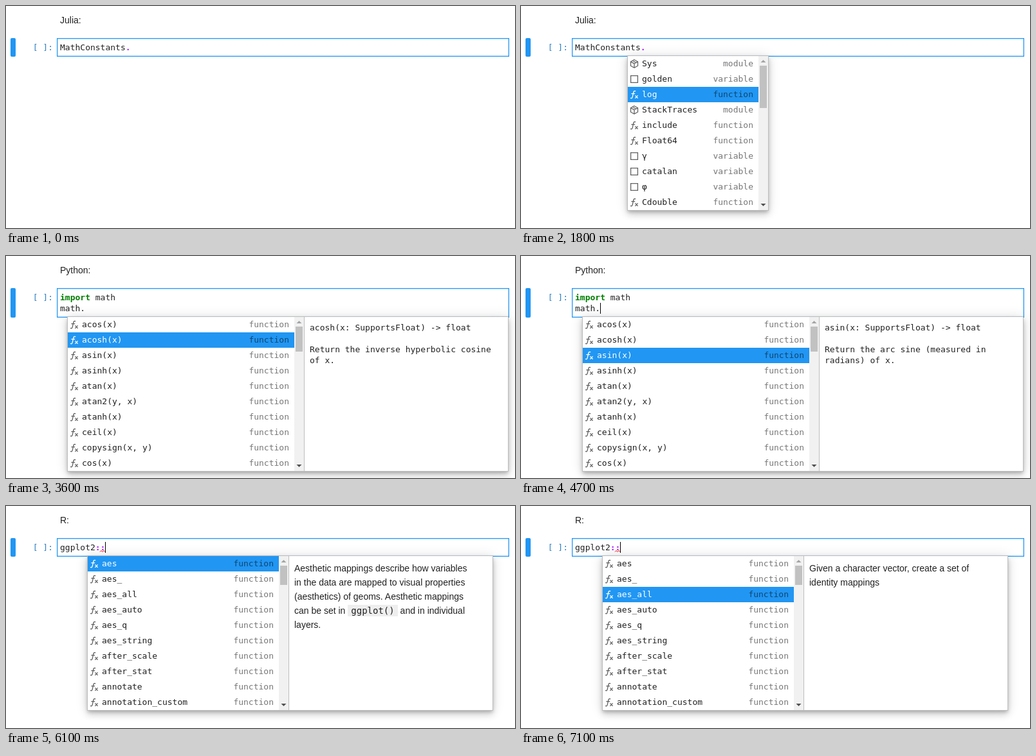
An HTML page that plays this animation: 791x346 px, repeating every 7.3 s.

```html
<!DOCTYPE html>
<html lang="en">
<head>
<meta charset="utf-8">
<title>Code completion in three languages</title>
<style>
html, body { margin: 0; width: 100%; height: 100%; overflow: hidden; background: #fff; }
body { position: relative; color: #212121; }
body * { position: absolute; box-sizing: border-box; }
.scene { inset: 0; visibility: hidden; }
.scene.on { visibility: visible; }
.title, .rich { font: 14px/22px "Liberation Sans", Arial, sans-serif; }
.title { left: 84px; top: 11px; }
.mono, .rich code { font: 13px/17px "DejaVu Sans Mono", monospace; white-space: pre; }
.prompt { right: calc(100% - 73px); top: 56px; color: #307fc1; }
.bar { left: 7px; top: 50px; width: 8px; border-radius: 2px; background: #2196f3; }
.editor { left: 79px; top: 50px; width: 703px; border: 1px solid #e0e0e0; background: #f5f5f5; }
.focus .editor { border-color: #2196f3; background: #fff; box-shadow: inset 0 0 2px #2196f3; }
.code { left: 84px; top: 56px; }
.code b, .code i { position: static; font-style: normal; font-weight: bold; }
.code b { color: #008000; }
.code i { color: #aa22ff; }
.squiggle { left: 0; top: 0; width: 100%; height: 100%; fill: none; stroke: #f00; }
.cursor { width: 1px; height: 17px; background: #000; visibility: hidden; }
.cursor.on { visibility: visible; }
.popup { height: 242px; border: 1px solid #bdbdbd; background: #fff; display: none;
  box-shadow: 0 3px 5px -1px rgba(0,0,0,.2), 0 6px 10px rgba(0,0,0,.14), 0 1px 18px rgba(0,0,0,.12); }
.popup.on { display: block; }
.row { left: 0; height: 24px; }
.row span { top: 3px; }
.row .name { left: 22px; }
.row .type { right: 8px; color: rgba(0,0,0,.54); }
.row svg { left: 2px; top: 4px; width: 16px; height: 16px; fill: none; stroke: #616161; stroke-width: 1.3; }
.row.on { background: #2196f3; }
.row.on .name { color: #fff; }
.row.on svg { stroke: #fff; }
.scroll { top: 0; width: 15px; height: 240px; background: #f1f1f1; }
.scroll svg { left: 0; top: 0; width: 15px; height: 240px; }
.thumb { left: 2px; top: 15px; width: 11px; background: #c1c1c1; }
.doc { top: 0; right: 0; height: 240px; border-left: 1px solid #bdbdbd; padding: 8px; overflow: hidden; display: none; }
.doc.on { display: block; }
.doc.mono { white-space: pre-wrap; }
.doc.rich { padding-right: 32px; }
.rich code { position: static; font-size: 14px; line-height: 22px; padding: 1px 5px; background: #eee; }
</style>
</head>
<body>
<script>
const LOOP = 7300;
const ICONS = {
  function: 'M10.2 3C8.4 1.6 7.2 2.8 6.7 5L5.3 11.4C4.8 13.7 3.6 14.4 2 13.3M3.4 6.6H9.2M9.4 9.4l4.2 4.4M13.6 9.4l-4.2 4.4',
  variable: 'M2.6 2.6h10.8v10.8H2.6z',
  module: 'M8 1.8l5.5 3v6.4l-5.5 3-5.5-3V4.8zM2.5 4.8L8 7.9l5.5-3.1M8 7.9v6.3M5.2 3.3l5.6 3.1'
};
const mathDoc = (name, text) => `${name}(x: SupportsFloat) -> float\n\nReturn the ${text} of x.`;
const aesIntro = 'Aesthetic mappings describe how variables in the data are mapped to visual properties (aesthetics) of geoms. ';

// popup: x, y of the border box, list width, doc width, thumb height
const scenes = [
  {
    start: 0, focus: 0, title: 'Julia:', lines: 1, code: 'MathConstants<i>.</i>',
    cursor: [194, 56], blinks: [200, 700, 1300, 1800],
    picks: [400, 900, 1200], popup: [165, 77, 203, 0, 66],
    items: ['Sys:module', 'golden:variable', 'log:function', 'StackTraces:module', 'include:function',
      'Float64:function', 'γ:variable', 'catalan:variable', 'φ:variable', 'Cdouble:function'],
    docs: []
  },
  {
    start: 2200, focus: 2600, title: 'Python:', lines: 2, code: '<b>import</b> math\nmath.',
    cursor: [123, 73], blinks: [2600, 3200, 3700, 4100, 4700],
    picks: [3100, 3600, 3900], popup: [95, 94, 352, 317, 39], docStyle: 'mono',
    items: ['acos(x)', 'acosh(x)', 'asin(x)', 'asinh(x)', 'atan(x)', 'atan2(y, x)', 'atanh(x)',
      'ceil(x)', 'copysign(x, y)', 'cos(x)'],
    docs: [
      mathDoc('acos', 'arc cosine (measured in radians)'),
      mathDoc('acosh', 'inverse hyperbolic cosine'),
      mathDoc('asin', 'arc sine (measured in radians)')
    ]
  },
  {
    start: 4900, focus: 5100, title: 'R:', lines: 1, code: 'ggplot2<i>::</i>', squiggle: 'M146 71.5l2-2 2 2 2-2 2 2',
    cursor: [154, 56], blinks: [5100, 5500, 6100, 6600, 7100],
    picks: [6000, 6500, 6800], popup: [126, 77, 297, 317, 30], docStyle: 'rich',
    items: ['aes', 'aes_', 'aes_all', 'aes_auto', 'aes_q', 'aes_string', 'after_scale', 'after_stat',
      'annotate', 'annotation_custom'],
    docs: [
      aesIntro + 'Aesthetic mappings can be set in <code>ggplot()</code> and in individual layers.',
      aesIntro + '<code>aes()</code> uses non-standard evaluation to capture the variable names. ' +
        '<code>aes_()</code> and <code>aes_string()</code> require you to explicitly quote the inputs ' +
        'either with "" for <code>aes_string()</code>, or with quote or ~ for <code>aes_()</code>.',
      'Given a character vector, create a set of identity mappings'
    ]
  }
];

function add(parent, cls, html = '', box = {}) {
  const el = document.createElement('div');
  el.className = cls;
  el.innerHTML = html;
  for (const key in box) el.style[key] = box[key] + 'px';
  return parent.appendChild(el);
}

function rowHtml(item) {
  const [name, type = 'function'] = item.split(':');
  return `<svg viewBox="0 0 16 16"><path d="${ICONS[type]}"/></svg>` +
    `<span class="mono name">${name}</span><span class="mono type">${type}</span>`;
}

function build(s) {
  const height = 12 + 17 * s.lines;
  const el = s.el = add(document.body, 'scene');
  add(el, 'title', s.title);
  add(el, 'bar', '', { height });
  add(el, 'mono prompt', '[ ]:');
  add(el, 'editor', '', { height });
  add(el, 'mono code', s.code);
  if (s.squiggle) el.insertAdjacentHTML('beforeend', `<svg class="squiggle"><path d="${s.squiggle}"/></svg>`);
  s.caret = add(el, 'cursor', '', { left: s.cursor[0], top: s.cursor[1] });

  const [left, top, list, docWidth, thumb] = s.popup;
  s.box = add(el, 'popup', '', { left, top, width: list + docWidth + 17 });
  s.rows = s.items.map((item, i) => add(s.box, 'row', rowHtml(item), { top: 24 * i, width: list }));
  const scroll = add(s.box, 'scroll',
    '<svg><path fill="#a3a3a3" d="M3.5 10l4-4 4 4z"/><path fill="#505050" d="M3.5 230l4 4 4-4z"/></svg>', { left: list });
  add(scroll, 'thumb', '', { height: thumb });
  s.panels = s.docs.map(text => add(s.box, 'doc ' + s.docStyle, text, { width: docWidth }));
}

const passed = (times, t) => times.filter(at => at <= t).length;
const toggle = (el, on, cls = 'on') => el.classList.toggle(cls, on);

function draw(now) {
  const t = now % LOOP;
  const current = scenes[passed(scenes.map(s => s.start), t) - 1];
  for (const s of scenes) {
    const active = s === current;
    const pick = passed(s.picks, t) - 1;
    toggle(s.el, active);
    toggle(s.el, t >= s.focus, 'focus');
    toggle(s.caret, active && passed(s.blinks, t) % 2 === 1);
    toggle(s.box, active && pick >= 0);
    s.rows.forEach((row, i) => toggle(row, i === pick));
    s.panels.forEach((panel, i) => toggle(panel, i === pick));
  }
}

scenes.forEach(build);
const begin = performance.now();
function tick() {
  draw(performance.now() - begin);
  requestAnimationFrame(tick);
}
tick();
</script>
</body>
</html>
```
